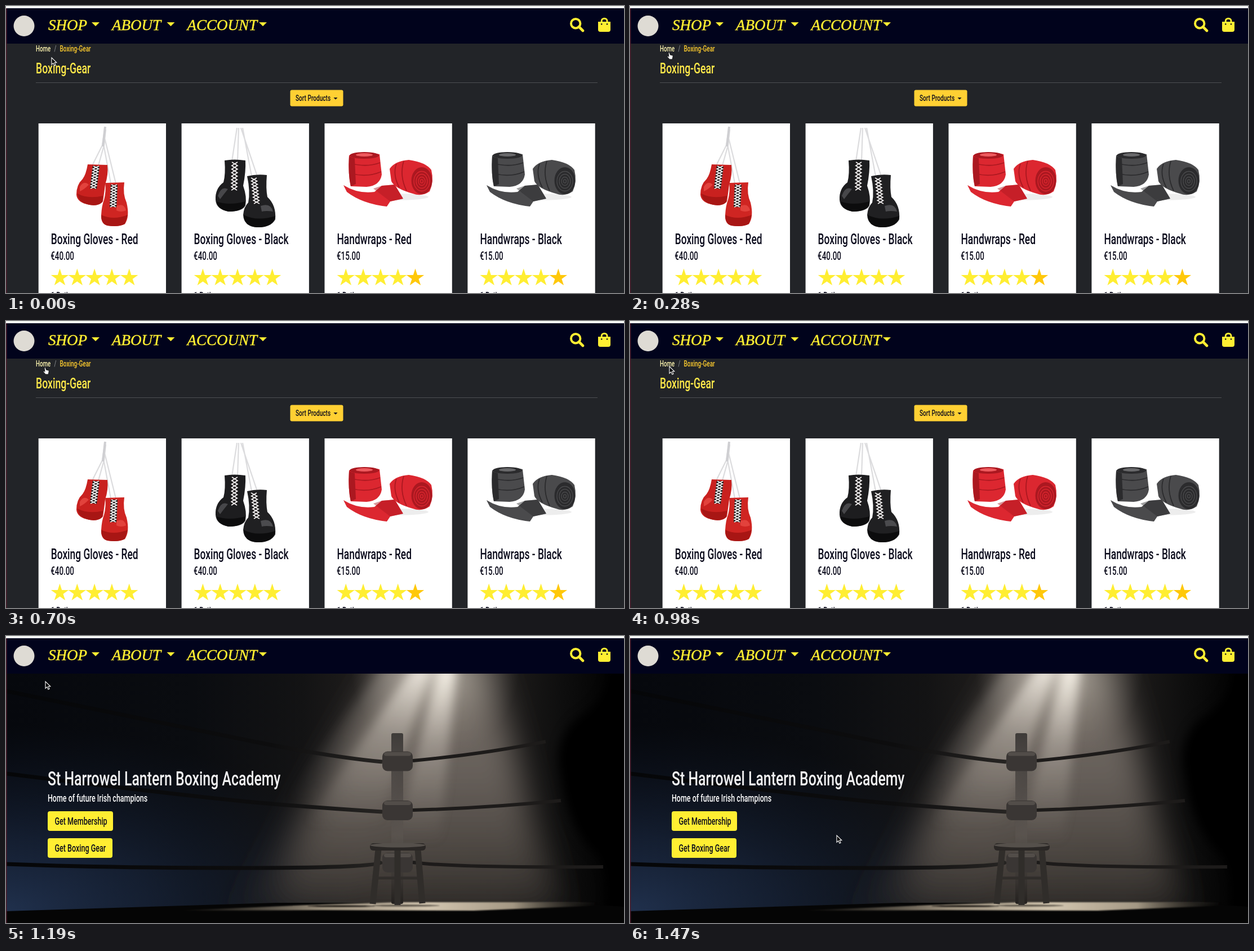
Recreate the animation shown at these times as an HTML page. Size 1097x511 px, loop 1.54 s.

```html
<!DOCTYPE html>
<html lang="en">
<head>
<meta charset="utf-8">
<title>Boxing shop</title>
<style>
  html, body { margin: 0; width: 100%; height: 100%; overflow: hidden; background: #222428; }
  svg { display: block; width: 100%; height: 100%; }
  .sans { font-family: Roboto, "Liberation Sans", sans-serif; white-space: pre; }
  .nav { font: italic 27px "Liberation Serif", serif; fill: #ffee32; stroke: #ffee32; stroke-width: .5; }
</style>
</head>
<body>
<svg id="stage" viewBox="0 0 1097 511" preserveAspectRatio="none"></svg>
<script>
const LOOP = 1540;
const YELLOW = '#ffee32', AMBER = '#ffc80a', PAGE = '#222428', INK = '#0b0b1c';
const CONDENSED = 0.69;

// ---- drawing helpers ----
const rect = (x, y, w, h, fill, r = 0, more = '') =>
  `<rect x="${x}" y="${y}" width="${w}" height="${h}" rx="${r}" fill="${fill}" ${more}/>`;
const path = (d, fill, more = '') => `<path d="${d}" fill="${fill}" ${more}/>`;
const line = (d, color, width, more = '') =>
  path(d, 'none', `stroke="${color}" stroke-width="${width}" ${more}`);
const oval = (x, y, rx, ry, fill, more = '') =>
  `<ellipse cx="${x}" cy="${y}" rx="${rx}" ry="${ry}" fill="${fill}" ${more}/>`;
const text = (x, y, size, str, fill = INK, weight = 500) =>
  `<text class="sans" transform="translate(${x} ${y}) scale(${CONDENSED} 1)" font-size="${size}" font-weight="${weight}" fill="${fill}">${str}</text>`;
const caret = (x, y, w, fill) => path(`M${x} ${y}h${w}l${-w / 2} ${w / 2}z`, fill);
const stops = list => list.map(([at, color, alpha = 1]) =>
  `<stop offset="${at}" stop-color="${color}" stop-opacity="${alpha}"/>`).join('');
const linear = (id, x2, y2, list) =>
  `<linearGradient id="${id}" x2="${x2}" y2="${y2}">${stops(list)}</linearGradient>`;
const radial = (id, list) => `<radialGradient id="${id}">${stops(list)}</radialGradient>`;
const blur = (id, size) =>
  `<filter id="${id}" x="-40%" y="-40%" width="180%" height="180%"><feGaussianBlur stdDeviation="${size}"/></filter>`;
const blurred = (id, ...parts) => `<g filter="url(#${id})">${parts.join('')}</g>`;

function star(cx, cy, r, fill) {
  const pts = Array.from({ length: 10 }, (_, i) => {
    const a = i * Math.PI / 5, k = i % 2 ? r * 0.385 : r;
    return `${(cx + k * Math.sin(a)).toFixed(1)},${(cy - k * Math.cos(a)).toFixed(1)}`;
  });
  return `<polygon points="${pts.join(' ')}" fill="${fill}"/>`;
}

function laces(x1, y1, x2, y2) {
  let a = '', b = '';
  for (let i = 0; i <= 8; i++) {
    const x = x1 + (x2 - x1) * i / 8, y = y1 + (y2 - y1) * i / 8, s = i % 2 ? 5 : -5;
    a += `${i ? 'L' : 'M'}${x + s} ${y}`;
    b += `${i ? 'L' : 'M'}${x - s} ${y}`;
  }
  return line(`M${x1} ${y1}L${x2} ${y2}`, '#1a1718', 12) + line(a + b, '#f1efef', 1.8);
}

// ---- product pictures ----
const strings = d => line(d, '#dcdcde', 2.2);

const redGloves =
  strings('M176 215L171 248L153 284M177 220L174 248L164 284M172 240L186 316M175 235L195 316') +
  line('M176 215L172 250', '#cfcfd2', 4) +
  path('M145 282L180 283Q182 300 176 318Q174 335 172 348Q165 357 148 354Q126 350 125 336Q125 318 136 308Q142 300 145 282Z', '#c9211f') +
  path('M127 334Q145 344 172 338L171 349Q163 357 148 354Q128 350 127 334Z', '#a81614') +
  path('M131 322Q138 310 147 318Q140 326 131 330Z', '#e2423c') +
  laces(160, 285, 155, 325) +
  path('M176 315L210 314Q207 335 214 350Q220 375 211 388Q200 394 180 391Q168 388 169 372Q170 355 174 345Q178 330 176 315Z', '#cf2522') +
  path('M169 372Q190 382 216 372L211 388Q200 394 180 391Q169 388 169 372Z', '#a81614') +
  path('M196 356Q210 350 213 364Q204 368 196 364Z', '#e2423c') +
  laces(192, 318, 190, 358);

const blackGloves =
  strings('M410 217L401 276M413 217L411 276M420 217L436 303M417 217L446 303') +
  path('M388 275Q405 272 425 275Q426 295 421 320Q428 340 425 355Q420 366 395 366Q373 362 372 345Q371 325 386 314Q390 300 388 275Z', '#1d1d1f') +
  path('M376 338Q382 320 394 326Q386 336 380 344Z', '#47474a') +
  path('M374 348Q395 356 425 348Q424 366 395 366Q376 362 374 348Z', '#0c0c0d') +
  laces(406, 278, 405, 328) +
  path('M428 303Q445 299 463 301Q461 325 464 340Q480 355 478 380Q470 395 445 394Q422 392 421 372Q422 358 430 350Q434 330 428 303Z', '#202022') +
  path('M452 356Q470 350 474 366Q462 364 454 366Z', '#4b4b4e') +
  path('M422 372Q445 384 478 374Q474 395 445 394Q422 392 422 372Z', '#0c0c0d') +
  laces(440, 306, 445, 352);

const wraps = (dx, base, dark, light) => `<g transform="translate(${dx} 0)">` +
  oval(690, 340, 60, 6, '#000', 'opacity=".07"') +
  path('M599 319Q625 335 654 331L667 320L690 318L705 343L682 348L676 357Q632 352 605 331Z', base) +
  path('M652 325L667 320L690 318L705 343L682 348Z', dark, 'opacity=".45"') +
  path('M609 266Q636 256 663 264L667 300Q664 320 640 322L612 321Q607 300 609 266Z', base) +
  oval(636, 266, 26, 6, dark) + oval(636, 265, 15, 3, light) +
  line('M611 280Q640 288 664 279M612 298Q640 306 666 295', dark, 1.8) +
  path('M609 268L619 271L621 317L612 321Q607 300 609 268Z', dark) +
  path('M681 290Q690 276 715 274Q745 278 755 292Q760 312 752 330Q738 340 722 334Q690 325 684 312Z', base) +
  line('M693 281Q686 300 698 323M706 276Q698 302 711 329', dark, 1.8) +
  oval(738, 311, 18.5, 24, dark) +
  [14, 10, 6, 2.5].map(r => oval(738, 312, r, r * 1.25, 'none', `stroke="${base}" stroke-width="1.3"`)).join('') +
  '</g>';

// ---- shop page ----
const products = [
  ['Boxing Gloves - Red', '€40.00', 5],
  ['Boxing Gloves - Black', '€40.00', 5],
  ['Handwraps - Red', '€15.00', 4],
  ['Handwraps - Black', '€15.00', 4],
];
const card = ([name, price, full], i) => {
  const x = 57.7 + i * 253.9, left = x + 22;
  return rect(x, 209, 226.3, 310, '#fff') +
    text(left, 424, 25.2, name) + text(left - .5, 452, 19.4, price) +
    [0, 1, 2, 3, 4].map(n => star(left + 15.8 + n * 30.8, 484, 16.5, n < full ? YELLOW : AMBER)).join('') +
    text(left, 520.5, 17, '1 Rating');
};
const shop = rect(0, 67, 1097, 444, PAGE) +
  text(53, 81, 14.1, 'Home', '#fff6b0') + text(85.5, 81, 14.1, '/', '#85888c') +
  text(95.5, 81, 14.5, 'Boxing-Gear', '#fdcb2e') +
  text(53, 120, 25.6, 'Boxing-Gear', '#ffe94a') +
  rect(53, 136, 997, 1, '#4d4f52') +
  rect(504.5, 149.5, 94, 29, '#ffd033', 3) + text(514, 169, 14.6, 'Sort Products') + caret(581.5, 163, 7, INK) +
  products.map(card).join('') + redGloves + blackGloves +
  wraps(0, '#dc2730', '#ab1820', '#ee5a5e') + wraps(254, '#4a4a4c', '#2b2b2d', '#69696b');

// ---- home page ----
const ropes = line('M0 98Q300 160 440 188T668 224M0 245Q330 286 440 296T668 313M0 406Q180 413 420 413T668 402', 'url(#rope)', 7) +
  line('M722 222Q850 210 958 188M722 310Q860 306 985 293M722 403Q800 413 1060 411', '#1d1b1a', 6);
const pad = y => rect(668, y, 54, 35, '#3a3634', 9) + rect(671, y + 1, 48, 7, '#524d49', 4);
const stool = line('M661 380L651 477M695 380V479M731 380L739 476', '#302d2a', 11) +
  line('M657 431H735', '#302d2a', 5) +
  rect(646, 369, 99, 13, '#2a2725', 6) + oval(695.5, 372.5, 49, 4, '#55504b');
const floor = path('M0 490L480 475H1000L1097 482V511H0Z', '#050505') +
  blurred('thin',
    path('M300 489L560 478L700 474H1050V480L830 489L560 488Z', 'url(#planks)'),
    oval(595, 481, 60, 2, '#14110e'),
    oval(710, 480, 60, 2, '#14110e', 'opacity=".6"'));
const photo = rect(0, 67, 1097, 444, 'url(#room)') +
  oval(0, 490, 640, 330, 'url(#blue)') +
  blurred('wide',
    path('M690 40H850Q900 190 930 320L990 490H480Q500 350 690 40Z', 'url(#haze)'),
    path('M690 40L400 500H620L760 40Z', 'url(#haze)', 'opacity=".4"')) +
  oval(762, 50, 150, 170, 'url(#lamp)') +
  blurred('soft',
    path('M722 55H757L660 340H530Z', 'url(#beam)', 'opacity=".85"'),
    path('M768 55H799L770 370H690Z', 'url(#beam)'),
    path('M668 55H715L570 300H490Z', 'url(#beam)', 'opacity=".2"'),
    path('M1110 55H1070Q1075 110 1010 150Q970 190 985 250Q1000 350 1050 390Q1080 430 1060 520H1110Z', '#000')) +
  floor + rect(684, 173, 21, 304, 'url(#post)', 3) + ropes + [205.5, 293, 386].map(pad).join('') + stool;
const button = (y, w, label) => rect(74, y, w, 35, YELLOW, 4) + text(86.5, y + 24, 18.2, label);
const home = photo + `<g id="cover">${rect(0, 106, 1097, 405, PAGE)}</g>` +
  text(74, 265.5, 36, 'St Harrowel Lantern Boxing Academy', '#f1f1f2') +
  text(74, 294.5, 18.1, 'Home of future Irish champions', '#fff') +
  button(312, 116, 'Get Membership') + button(360, 115, 'Get Boxing Gear');

// ---- bar on top of both pages ----
const menu = [['SHOP', 75, 152], ['ABOUT', 188, 285.5], ['ACCOUNT', 321.5, 449]];
const bar = rect(0, 0, 1097, 4, '#f6faf5') + rect(0, 4, 1097, 63, '#01031c') +
  '<circle cx="32" cy="35.5" r="18.5" fill="#dedbd4"/>' +
  menu.map(([label, x, cx]) => `<text class="nav" x="${x}" y="43">${label}</text>` + caret(cx, 29, 14, YELLOW)).join('') +
  `<circle cx="1011.2" cy="31.2" r="8.2" fill="none" stroke="${YELLOW}" stroke-width="4"/>` +
  line('M1017 37L1024 44', YELLOW, 4.6, 'stroke-linecap="round"') +
  path('M1051 28h22v14a4 4 0 0 1-4 4h-14a4 4 0 0 1-4-4z', YELLOW) +
  line('M1057.2 29V26.5a4.9 4.3 0 0 1 9.8 0V29', YELLOW, 3) +
  oval(1057.2, 32.3, 1.2, 1.2, '#01031c') + oval(1067, 32.3, 1.2, 1.2, '#01031c') +
  rect(0, 4, 1.5, 507, '#4a1c2c');

const arrow = path('M0 0V12.2L2.9 9.6L4.9 14L7 13.1L5.1 8.8H8.8Z', '#000', 'stroke="#fff" stroke-width="1.1"');
const hand = path('M2 1Q3.5 0 4.3 1.6L5.4 5L9 5.6Q10.4 6 10.2 8L9.3 13H4.2L.2 8.4Q0 7 1.6 7.2L3 8.2Z', '#fff', 'stroke="#111" stroke-width="1"');

const defs = '<defs>' +
  linear('room', 1, 0, [[0, '#06080d'], [.3, '#0a0c10'], [.48, '#131314'], [.62, '#24211f'], [.8, '#1f1d1c'], [.9, '#0e0e0e'], [1, '#000']]) +
  radial('blue', [[0, '#233554', .9], [.4, '#1b2942', .65], [1, '#121b2c', 0]]) +
  linear('haze', 0, 1, [[0, '#8a8279', .8], [.45, '#79716a', .8], [.75, '#5d5650', .75], [1, '#3a3531', .6]]) +
  radial('lamp', [[0, '#e6dfd2', .75], [.5, '#b5ada2', .35], [1, '#857d75', 0]]) +
  linear('beam', 0, 1, [[0, '#fffaf0', .9], [.4, '#d8d0c6', .45], [1, '#a89f96', 0]]) +
  linear('post', 0, 1, [[0, '#3a3735', .95], [.35, '#4d4845', .8], [.6, '#5c5651', .65], [1, '#24211f']]) +
  linear('rope', 1, 0, [[0, '#050608'], [.7, '#0d0d0e'], [1, '#262422']]) +
  linear('planks', 1, 0, [[0, '#6b6356', 0], [.35, '#9c907d'], [.6, '#d3c6b0'], [.8, '#a39783'], [1, '#4a443b', 0]]) +
  blur('wide', 28) + blur('soft', 9) + blur('thin', 1.2) + '</defs>';

document.getElementById('stage').innerHTML = defs + shop + `<g id="home">${home}</g>` + bar +
  `<g id="pointer"><g id="arrow">${arrow}</g><g id="hand">${hand}</g></g>`;

// ---- motion: every value holds until the next time in its table ----
function hold(id, prop, table) {
  const frames = table.map(([t, v]) => ({ offset: t / LOOP, [prop]: v, easing: 'steps(1, end)' }));
  frames.push({ ...frames[frames.length - 1], offset: 1 });
  document.getElementById(id).animate(frames, { duration: LOOP, iterations: Infinity });
}
const moves = [[0, 81, 92], [70, 80, 99], [140, 75, 95], [210, 65, 84], [280, 66, 82], [910, 70, 81], [1400, 250, 250], [1470, 367, 355]];
hold('pointer', 'transform', moves.map(([t, x, y]) => [t, `translate(${x}px, ${y}px)`]));
hold('arrow', 'opacity', [[0, 1], [210, 0], [910, 1]]);
hold('hand', 'opacity', [[0, 0], [210, 1], [910, 0]]);
hold('home', 'opacity', [[0, 0], [1120, 1]]);
hold('cover', 'opacity', [[0, 1], [1190, 0]]);
</script>
</body>
</html>
```
